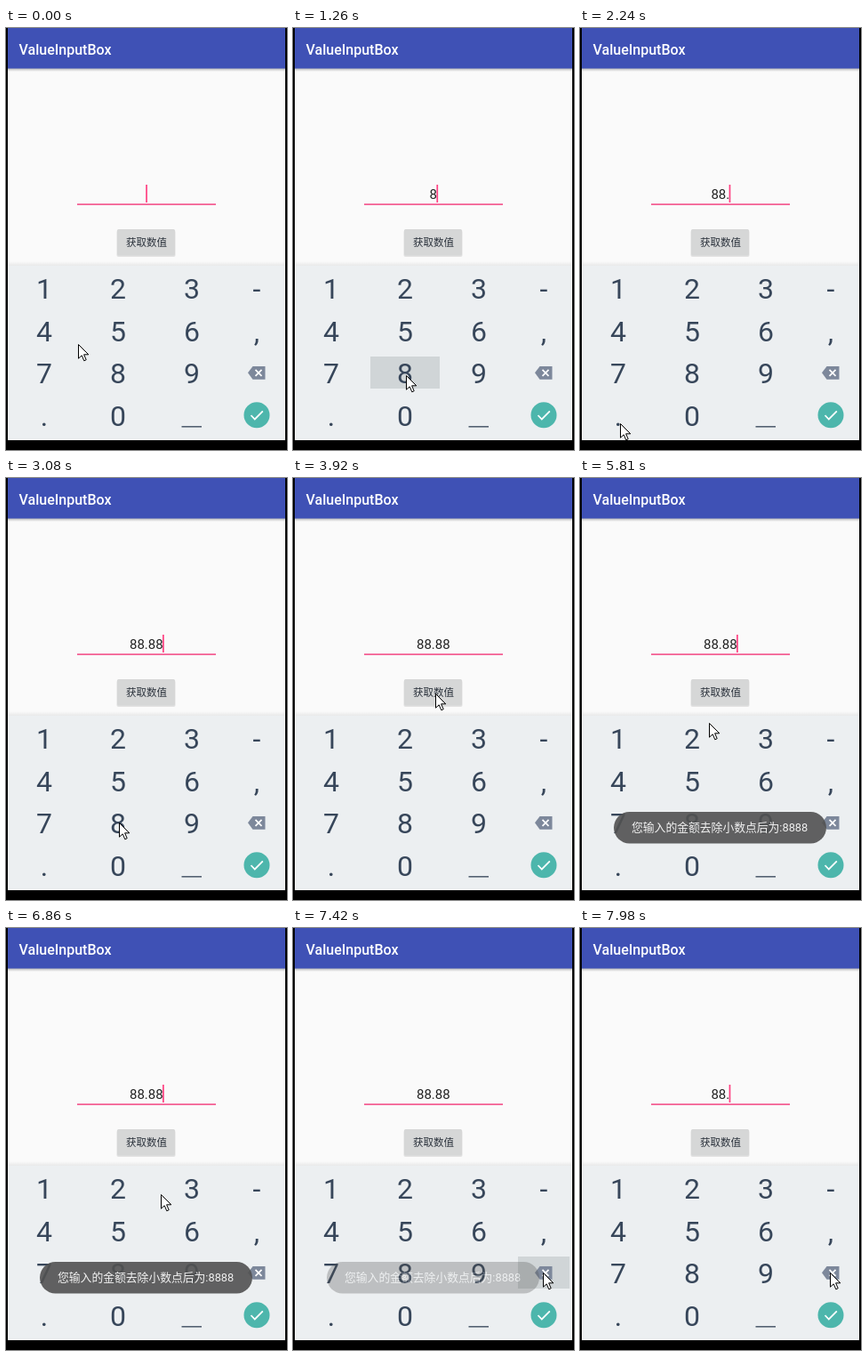
Recreate the animation shown at these times as an HTML page. Size 316x474 px, loop 8000 ms.

```html
<!DOCTYPE html>
<html lang="zh">
<head>
<meta charset="utf-8">
<title>ValueInputBox</title>
<style>
  html, body { margin: 0; height: 100%; overflow: hidden; background: #000; }
  svg { display: block; width: 100%; height: 100%; }
  text { font-family: Roboto, "Noto Sans CJK SC", "Noto Sans CJK", sans-serif; }
  #keys text { font-size: 32px; fill: #37465a; text-anchor: middle; }
</style>
</head>
<body>
<svg viewBox="0 0 316 474">
  <defs>
    <linearGradient id="down" x2="0" y2="1">
      <stop stop-opacity=".28"/><stop offset="1" stop-opacity="0"/>
    </linearGradient>
    <linearGradient id="up" x2="0" y2="1">
      <stop stop-opacity="0"/><stop offset="1" stop-opacity=".07"/>
    </linearGradient>
  </defs>

  <rect x="2" width="312" height="463" fill="#fafafa"/>
  <rect x="2" y="45" width="312" height="4" fill="url(#down)"/>
  <rect x="2" width="312" height="45.5" fill="#3f51b5"/>
  <text x="14.5" y="30" font-size="16" font-weight="500" fill="#fff">ValueInputBox</text>

  <text id="amount" x="157.8" y="192" font-size="15" fill="#222" text-anchor="middle"></text>
  <rect x="80" y="197.3" width="156" height="1.6" fill="#f4508a"/>
  <rect id="caret" y="176" width="1.7" height="20" fill="#ff4081"/>

  <rect x="124.5" y="227" width="66" height="30" rx="2" opacity=".1"/>
  <rect x="125" y="226" width="65" height="29.5" rx="1.5" fill="#d6d7d7"/>
  <rect id="ripple" x="125" y="226" width="65" height="29.5" rx="1.5" opacity="0"/>
  <text x="135" y="245" font-size="11.5" font-weight="500" fill="#2b323c">获取数值</text>

  <rect x="2" y="262" width="312" height="5" fill="url(#up)"/>
  <rect x="2" y="267" width="312" height="196" fill="#eceff1"/>
  <rect id="press" height="36" fill="#d0d5d7"/>
  <g id="keys"></g>
  <path d="M197.5 447.8H220" stroke="#4b596b" stroke-width="1.5"/>
  <path d="M272 387.3L277.5 380H291.5V394.7H277.5Z" fill="#7d889b"/>
  <path d="M280.5 383.8l7 7m0-7l-7 7" stroke="#fff" stroke-width="1.7"/>
  <circle cx="282" cy="434.7" r="14.5" fill="#4db6ac"/>
  <path d="M275.5 435l4.3 4.5 9-9.2" fill="none" stroke="#fff" stroke-width="1.8"/>

  <g id="toast">
    <rect x="38" y="375" width="239" height="35.5" rx="17.7" fill="#525252" opacity=".9"/>
    <text x="58" y="397" font-size="12.8" fill="#f2f2f2">您输入的金额去除小数点后为:8888</text>
  </g>

  <path id="pointer" d="M.5.5V16.2L4.2 12.8 6.8 18.8 9.2 17.7 6.6 11.8H11.8Z" fill="#fff" stroke="#000"/>
</svg>
<script>
const LOOP = 8000, STEP = 70;
const $ = id => document.getElementById(id);
const set = (id, attrs) => {
  for (const k in attrs) $(id).setAttribute(k, attrs[k]);
};
const clamp = v => Math.min(1, Math.max(0, v));
const span = (t, a, b) => clamp((t - a) / (b - a));
const ease = p => p * p * (3 - 2 * p);

const cols = [43, 126, 209, 282];
["123-", "456,", "789", ".0"].forEach((row, r) =>
  [...row].forEach((ch, c) => {
    $("keys").innerHTML += `<text x="${cols[c]}" y="${304 + r * 47.5}">${ch}</text>`;
  }));

// time, x, y
const path = [
  [140, 81, 355], [910, 127, 390], [1610, 127, 390], [1960, 45, 444],
  [2240, 45, 444], [2590, 127, 387], [3150, 127, 387], [3920, 160, 242],
  [5740, 160, 242], [5810, 145, 275], [6090, 144, 275], [6650, 144, 275],
  [7350, 281, 387]
];

// x, y, width of each pressed key
const eight = [87, 369, 78], dot = [5, 417, 77], del = [253, 369, 58];
const presses = [
  [1050, 1120, eight], [1260, 1400, eight], [2100, 2240, dot],
  [2730, 2870, eight], [2940, 3080, eight], [7420, 7560, del], [7910, 7980, del]
];

const edits = [
  [0, ""], [1120, "8"], [1330, "88"], [2170, "88."], [2800, "88.8"],
  [3080, "88.88"], [7490, "88.8"], [7980, "88."]
];

// the caret flips at each of these times
const blinks = [420, 910, 1820, 2170, 2590, 2800, 3500, 3990, 4480, 4900,
  5390, 5810, 6300, 6790, 7280, 7490];

function pointerAt(t) {
  const i = path.findIndex(p => p[0] > t);
  if (i < 0) return path[path.length - 1].slice(1);
  if (i === 0) return path[0].slice(1);
  const [ta, xa, ya] = path[i - 1], [tb, xb, yb] = path[i];
  const p = ease(span(t, ta, tb));
  return [xa + (xb - xa) * p, ya + (yb - ya) * p];
}

function draw(t) {
  set("pointer", { transform: `translate(${pointerAt(t).map(Math.round)})` });

  const text = edits.filter(e => e[0] <= t).pop()[1];
  const width = [...text].reduce((w, ch) => w + (ch === "." ? 3.95 : 8.43), 0);
  $("amount").textContent = text;
  set("caret", {
    x: 157.2 + width / 2,
    opacity: blinks.filter(b => b <= t).length % 2 ? 0 : 1
  });

  const hit = presses.find(p => p[0] <= t && t < p[1]);
  const [x, y, w] = hit ? hit[2] : [0, 0, 0];
  set("press", { x, y, width: w });

  set("ripple", { opacity: t < 3990 ? 0 : 0.07 * (1 - span(t, 4200, 4620)) });
  const show = 1 - (1 - span(t, 4000, 4480)) ** 2;
  set("toast", { opacity: show * (1 - span(t, 7140, 7560)) });
}

function tick(now) {
  draw(Math.floor(now % LOOP / STEP) * STEP);
  requestAnimationFrame(tick);
}
tick(performance.now());
</script>
</body>
</html>
```
